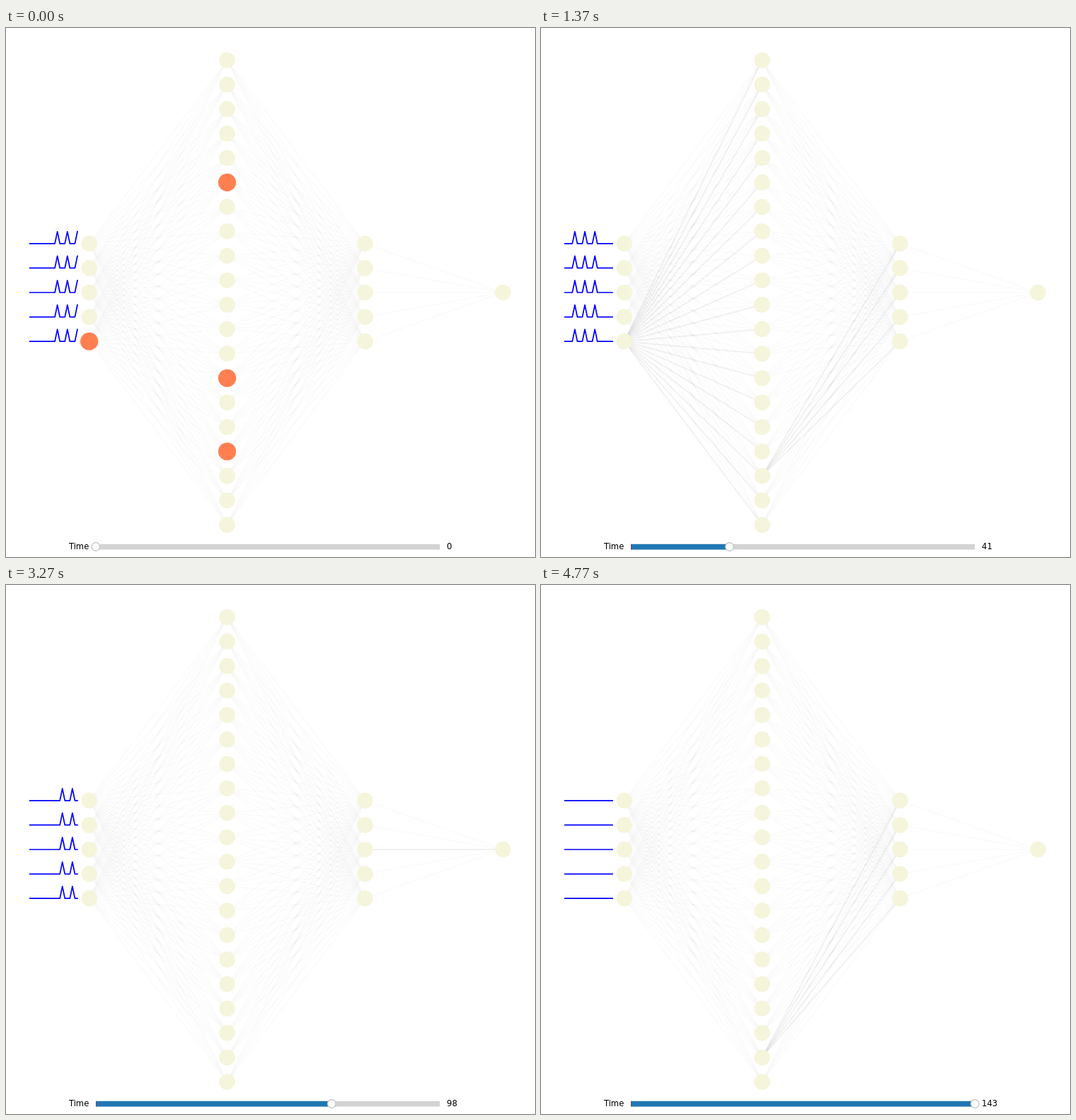
These frames come from a looping animation (748 by 748 pixels, 4810 ms). An HTML page:

```html
<!DOCTYPE html>
<html lang="en">
<head>
<meta charset="utf-8">
<title>Spiking network</title>
<style>
  html, body { margin: 0; width: 100%; height: 100%; overflow: hidden; background: #fff; }
  svg { display: block; width: 100%; height: 100%; }
  text { font: 11.6px "DejaVu Sans", Verdana, sans-serif; fill: #000; }
  .edge { stroke: #000; stroke-width: 2; stroke-opacity: .016; }
  .edge.on { stroke-opacity: .055; }
  .node { fill: #f5f5dc; r: 11.3px; }
  .node.on { fill: #ff7f50; r: 12.6px; }
  .wave { fill: none; stroke: #00f; stroke-width: 1.74; stroke-linecap: square; stroke-linejoin: round; }
</style>
</head>
<body>
<svg id="stage" viewBox="0 0 748 748"></svg>
<script>
const LOOP = 4810, STEPS = 144, CYCLE = 24;
const LAYERS = [5, 20, 5, 1];
const GAP = 34.58, MID = 374;
const BURST = [0, 4, 8];
const WINDOW = 20, WAVE_X = 33.7, WAVE_DX = 3.54, WAVE_H = 17;
const TRACK = { x: 127, y: 729.8, w: 486.5, h: 7.7 };

// phase in the cycle -> [layer, index] of the firing neurons
const FIRING = {
  0: [[0, 4], [1, 5], [1, 13], [1, 16]],
  1: [[2, 2]],
  4: [[0, 4], [1, 18], [1, 19]],
  5: [[2, 2]],
  6: [[3, 0]],
  8: [[0, 4], [1, 17]],
  12: [[0, 4]],
  16: [[0, 4], [1, 17]],
  22: [[1, 18]]
};

const stage = document.getElementById('stage');

function add(tag, attrs, text) {
  const el = document.createElementNS('http://www.w3.org/2000/svg', tag);
  for (const key in attrs) el.setAttribute(key, attrs[key]);
  if (text) el.textContent = text;
  return stage.appendChild(el);
}

const nodeX = layer => 117.7 + 195 * layer;
const nodeY = (layer, i) => MID + (i - (LAYERS[layer] - 1) / 2) * GAP;
const each = (n, fn) => Array.from({ length: n }, (_, i) => fn(i));

// outgoing edges, grouped by their start neuron
const edges = LAYERS.map((n, layer) => each(n, i =>
  each(LAYERS[layer + 1] || 0, j => add('line', {
    class: 'edge',
    x1: nodeX(layer), y1: nodeY(layer, i),
    x2: nodeX(layer + 1), y2: nodeY(layer + 1, j)
  }))));

const nodes = LAYERS.map((n, layer) => each(n, i =>
  add('circle', { class: 'node', cx: nodeX(layer), cy: nodeY(layer, i) })));

const waves = each(LAYERS[0], () => add('polyline', { class: 'wave' }));

add('text', { x: 117.3, y: 736.7, 'text-anchor': 'end' }, 'Time');
add('rect', { x: TRACK.x, y: TRACK.y, width: TRACK.w, height: TRACK.h, fill: '#d3d3d3' });
const bar = add('rect', { x: TRACK.x, y: TRACK.y, height: TRACK.h, fill: '#1f77b4' });
add('rect', { x: TRACK.x, y: TRACK.y, width: .6, height: TRACK.h, fill: '#f00' });
const knob = add('circle', { cy: 733.5, r: 5.8, fill: '#fff', stroke: '#bfbfbf', 'stroke-width': 1.16 });
const value = add('text', { x: 623.3, y: 736.7 });

const spikesAt = t => t < STEPS && BURST.includes(t % CYCLE);
const firingAt = step => step < 0 ? [] : FIRING[step % CYCLE] || [];

function show(step) {
  stage.querySelectorAll('.on').forEach(el => el.classList.remove('on'));
  for (const [layer, i] of firingAt(step)) nodes[layer][i].classList.add('on');
  for (const [layer, i] of firingAt(step - 1))
    edges[layer][i].forEach(el => el.classList.add('on'));

  // the right end of the trace is the present, upcoming spikes wait to its left
  waves.forEach((wave, i) => {
    const points = each(WINDOW, k => {
      const up = spikesAt(step + WINDOW - 1 - k) ? WAVE_H : 0;
      return (WAVE_X + k * WAVE_DX).toFixed(2) + ',' + (nodeY(0, i) - up).toFixed(2);
    });
    wave.setAttribute('points', points.join(' '));
  });

  const w = TRACK.w * step / (STEPS - 1);
  bar.setAttribute('width', w);
  knob.setAttribute('cx', TRACK.x + w);
  value.textContent = step;
}

// 30 steps per second, each starting on a whole 10 ms
const stepAt = ms => Math.min(STEPS - 1, Math.floor((Math.floor(ms / 10) + .5) * .3));

let shown = -1;
const start = performance.now();

function tick() {
  const step = stepAt((performance.now() - start) % LOOP);
  if (step !== shown) show(shown = step);
  requestAnimationFrame(tick);
}
tick();
</script>
</body>
</html>
```
